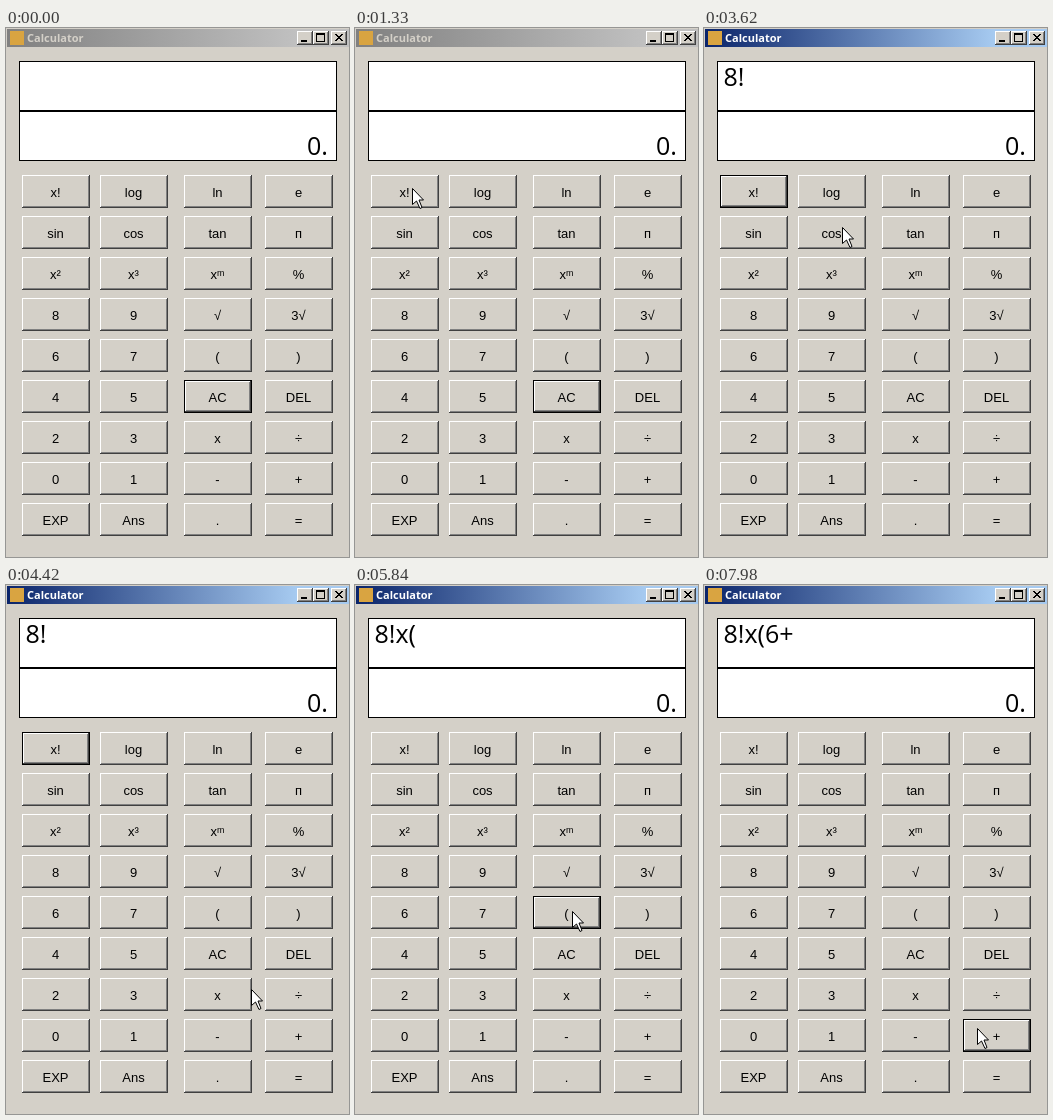
An HTML page with a canvas for the animation above (8 s loop, 343 px wide and 529 px high).

```html
<!DOCTYPE html>
<html lang="en">
<head>
<meta charset="utf-8">
<title>Calculator</title>
<style>
  html, body { margin: 0; width: 100%; height: 100%; overflow: hidden; background: #d4d0c8; }
  canvas { display: block; width: 343px; height: 529px; }
</style>
</head>
<body>
<canvas id="stage"></canvas>
<script>
const W = 343, H = 529, LOOP = 8000, STEP = 80;
const FACE = '#d4d0c8', SHADOW = '#808080', DARK = '#404040';
const canvas = document.getElementById('stage');
const ctx = canvas.getContext('2d');
const dpr = window.devicePixelRatio || 1;
canvas.width = Math.round(W * dpr);
canvas.height = Math.round(H * dpr);
ctx.scale(dpr, dpr);

const COLS = [16, 94, 178, 259];
const KEYS = [
  'x! log ln e', 'sin cos tan п', 'x² x³ xᵐ %', '8 9 √ 3√', '6 7 ( )',
  '4 5 AC DEL', '2 3 x ÷', '0 1 - +', 'EXP Ans . ='
].map(row => row.split(' '));

const CLICKS = [
  { key: '8', down: 2590, up: 2670 },
  { key: 'x!', down: 3150, up: 3230 },
  { key: 'x', down: 4890, up: 5000 },
  { key: '(', down: 5760, up: 5840 },
  { key: '6', down: 6940, up: 7020 },
  { key: '+', down: 7820, up: 7980 }
];

// Each leg runs from the end of the one before, bent towards an optional point
const START = [287, 414];
const LEGS = [
  { from: 210, till: 1010, to: [81, 151], bend: [126, 192] },
  { from: 1010, till: 1490, to: [54, 167], bend: [54, 155] },
  { from: 1640, till: 2510, to: [59, 285], bend: [75, 386] },
  { from: 2670, till: 3070, to: [54, 160] },
  { from: 3380, till: 4260, to: [261, 380], bend: [227, 217] },
  { from: 4260, till: 4730, to: [217, 414], bend: [237, 425] },
  { from: 5200, till: 5680, to: [217, 326] },
  { from: 6070, till: 6630, to: [46, 342] },
  { from: 7020, till: 7820, to: [273, 443] }
];

function pointerAt(t) {
  let pos = START;
  for (const { from, till, to, bend = to.map((v, i) => (v + pos[i]) / 2) } of LEGS) {
    if (t < from) break;
    const steps = Math.round((till - from) / STEP);
    const k = Math.min(1, Math.floor((t - from) / (till - from) * steps + 1e-6) / steps);
    pos = pos.map((v, i) =>
      Math.round((1 - k) ** 2 * v + 2 * k * (1 - k) * bend[i] + k * k * to[i]));
  }
  return pos;
}

function rect(x, y, w, h, color) {
  ctx.fillStyle = color;
  ctx.fillRect(x, y, w, h);
}

function text(str, x, y, font, color = '#000', align = 'left') {
  ctx.font = font;
  ctx.fillStyle = color;
  ctx.textAlign = align;
  ctx.fillText(str, x, y);
}

function raised(x, y, w, h) {
  rect(x, y, w, h, DARK);
  rect(x, y, w - 1, h - 1, '#fff');
  rect(x + 1, y + 1, w - 2, h - 2, SHADOW);
  rect(x + 1, y + 1, w - 3, h - 3, FACE);
}

function drawKey(label, x, y, focused, held) {
  const w = 68, h = 33, shift = held ? 1 : 0;
  if (focused) rect(x, y, w, h, '#000');
  if (held) {
    rect(x + 1, y + 1, w - 2, h - 2, SHADOW);
    rect(x + 2, y + 2, w - 4, h - 4, FACE);
  } else if (focused) raised(x + 1, y + 1, w - 2, h - 2);
  else raised(x, y, w, h);
  text(label, x + 33.5 + shift, y + 22 + shift,
    '13px "Liberation Sans", "DejaVu Sans", sans-serif', '#000', 'center');
}

function drawTitle(active) {
  const fade = ctx.createLinearGradient(1, 0, 290, 0);
  fade.addColorStop(0, active ? '#0a246a' : '#808080');
  fade.addColorStop(1, active ? '#a6caf0' : '#c0c0c0');
  rect(1, 1, 342, 18, fade);
  rect(4, 3, 14, 14, '#d9a441');
  text('Calculator', 21, 14, 'bold 11px "Noto Sans", sans-serif', active ? '#fff' : FACE);

  for (const x of [291, 307, 325]) raised(x, 3, 16, 14);
  rect(295, 12, 6, 2, '#000');
  rect(310, 5, 9, 9, '#000');
  rect(311, 7, 7, 6, FACE);
  for (let i = 0; i < 7; i++) {
    rect(329 + i, 6 + i, 2, 1, '#000');
    rect(335 - i, 6 + i, 2, 1, '#000');
  }
}

function drawDisplay(typed) {
  const font = '25px "Open Sans", "Noto Sans", sans-serif';
  rect(13, 33, 318, 100, '#000');
  rect(14, 34, 316, 48, '#fff');
  rect(14, 84, 316, 48, '#fff');
  text(typed, 19.5, 58, font);
  text('0.', 301, 127, font);
}

function drawPointer([x, y]) {
  const shape = [[0, 0], [0, 16], [4, 12.5], [7.5, 20], [9.5, 19], [6.5, 11.5], [11, 11.5]];
  ctx.beginPath();
  for (const [dx, dy] of shape) ctx.lineTo(x + dx + 0.5, y + dy + 0.5);
  ctx.closePath();
  ctx.fillStyle = '#fff';
  ctx.fill();
  ctx.strokeStyle = '#000';
  ctx.lineWidth = 1;
  ctx.stroke();
}

function draw(t) {
  const last = CLICKS.filter(c => c.down <= t).pop();
  const typed = CLICKS.filter(c => c.up <= t).map(c => c.key.replace('x!', '!')).join('');
  const focus = last ? last.key : 'AC';
  const held = Boolean(last) && t < last.up;

  rect(0, 0, W, H, FACE);
  drawTitle(Boolean(last));
  drawDisplay(typed);
  KEYS.forEach((row, r) => row.forEach((label, c) => {
    const focused = label === focus;
    drawKey(label, COLS[c], 147 + 41 * r, focused, focused && held);
  }));
  if (t >= LEGS[0].from) drawPointer(pointerAt(t));
}

const begin = performance.now();
function tick() {
  draw((performance.now() - begin) % LOOP);
  requestAnimationFrame(tick);
}
tick();
</script>
</body>
</html>
```
